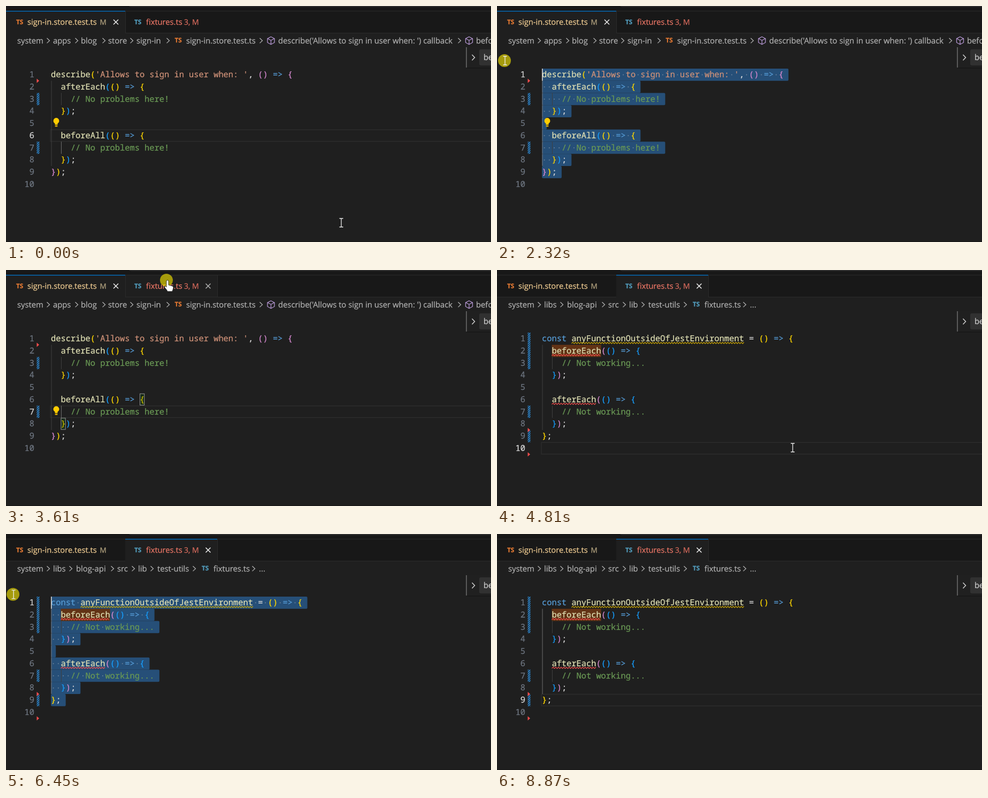
Write an HTML page that moves like this. It is 907x441 px and loops after 8950 ms.

```html
<!DOCTYPE html>
<html lang="en">
<head>
<meta charset="utf-8">
<title>Editor</title>
<style>
  html, body { margin: 0; width: 100%; height: 100%; overflow: hidden; background: #1f1f1f; }
  svg { display: block; width: 907px; height: 441px; }
  text {
    font-family: "Open Sans", "Noto Sans", sans-serif; text-rendering: geometricPrecision;
    fill: currentColor; stroke: currentColor; stroke-width: .25px;
  }
  .code text { font-family: "Noto Sans Mono", "DejaVu Sans Mono", monospace; font-size: 15.37px; }
</style>
</head>
<body>
<svg id="stage" viewBox="0 0 907 441">
  <defs>
    <pattern id="hatch" width="4" height="4" patternUnits="userSpaceOnUse">
      <path d="M-1 1L1 -1M0 4L4 0M3 5L5 3" stroke="#2b8bd8" stroke-width="1.6"/>
    </pattern>
  </defs>
  <rect width="907" height="441" fill="#1f1f1f"/>
  <rect y="440" width="907" height="1" fill="#181818"/>
  <g id="back"></g>
  <g id="text" class="code"></g>
  <g id="front" class="code"></g>
  <g id="chrome"></g>
  <g id="mouse"></g>
</svg>
<script>
const LOOP = 8950, LEFT = 84, TOP = 117, ROW = 22.75, CH = 9.222;
const layer = id => document.getElementById(id);
const colX = c => LEFT + c * CH;
const rowY = r => TOP + r * ROW;

const files = [
  {
    lines: [
      "describe('Allows to sign in user when: ', () => {",
      "  afterEach(() => {",
      "    // No problems here!",
      "  });",
      "",
      "  beforeAll(() => {",
      "    // No problems here!",
      "  });",
      "});",
      ""
    ],
    changed: [2, 6], removed: [1]
  },
  {
    lines: [
      "const anyFunctionOutsideOfJestEnvironment = () => {",
      "  beforeEach(() => {",
      "    // Not working...",
      "  });",
      "",
      "  afterEach(() => {",
      "    // Not working...",
      "  });",
      "};",
      ""
    ],
    changed: [0, 1, 2, 6, 8], removed: [8, 10],
    squiggles: [[0, 6, 35, "#cca700"], [1, 2, 10, "#f14c4c"], [5, 2, 9, "#f14c4c"]]
  }
];

// --- SVG helpers ---
const rect = (x, y, w, h, fill, more = "") =>
  `<rect x="${x}" y="${y}" width="${w}" height="${h}" fill="${fill}" ${more}/>`;
const label = (x, y, s, color, size, more = "") =>
  `<text x="${x}" y="${y}" color="${color}" font-size="${size}" ${more}>${s}</text>`;
const line = (d, color, width = 1, more = "") =>
  `<path d="${d}" fill="none" stroke="${color}" stroke-width="${width}" ${more}/>`;
const mono = (x, r, s, color, more = "") =>
  `<text x="${x}" y="${rowY(r) + 16}" color="${color}" ${more}>${s.replace(/>/g, "&gt;")}</text>`;

// --- Code text with nested bracket colours ---
const BRACKETS = ["#ffd700", "#d488ce", "#179fff"];

function highlight(lines) {
  let depth = 0, out = "";
  const color = tok => {
    if (/^[({]/.test(tok)) return BRACKETS[depth++ % 3];
    if (/^[)}]/.test(tok)) return BRACKETS[--depth % 3];
    if (tok.startsWith("//")) return "#6a9955";
    if (tok.startsWith("'")) return "#ce9178";
    if (tok === "const" || tok === "=>") return "#569cd6";
    return /\w/.test(tok) ? "#e0e0b4" : "#dcdcdc";
  };
  lines.forEach((s, r) => {
    for (const m of s.matchAll(/\/\/.*|'[^']*'|\w+|=>|\S/g))
      out += mono(colX(m.index), r, m[0], color(m[0]));
  });
  return out;
}

function squiggle([r, c, n, color]) {
  const x0 = colX(c), y = rowY(r) + 19.3;
  let d = `M${x0} ${y + 1}`;
  for (let x = 2.5, up = true; x <= n * CH; x += 2.5, up = !up) d += `L${x0 + x} ${y + (up ? -1.3 : 1.3)}`;
  return line(d, color, 1.2);
}

function fileText(f) {
  const bars = f.changed.map(r => rect(57.5, rowY(r), 5, ROW, "url(#hatch)"));
  const marks = f.removed.map(r => `<path d="M57.5 ${rowY(r) - 4}l4.5 4l-4.5 4z" fill="#f14c4c"/>`);
  return bars.join("") + marks.join("") + highlight(f.lines) + (f.squiggles || []).map(squiggle).join("");
}
const rendered = files.map(fileText);

// --- Tabs, breadcrumbs, find box ---
const chevron = x => line(`M${x - 2.5} 60l5 4.7l-5 4.7`, "#b0b0b0", 1.3);
const cube = x => line(`M${x} 57.5l6.5 3.3v7.4l-6.5 3.6l-6.5 -3.6v-7.4zM${x - 6.5} 60.8l6.5 3.5l6.5 -3.5M${x} 64.3v7.5`, "#b496d2", 1.3);
const cross = (x, color) => line(`M${x - 4.5} 25.5l9 9m0 -9l-9 9`, color, 1.5);
const badge = (x, y, color) => label(x, y, "TS", color, 11.8, 'font-weight="700"');
const crumb = (x, s, size = 14.8) => label(x, 70, s, "#b0b0b0", size);
const ORANGE = "#e37933", BLUE = "#519aba";

function crumbs(file, symbol) {
  if (!file)
    return crumb(21, "system") + crumb(88, "apps") + crumb(140, "blog") + crumb(191, "store") + crumb(244, "sign-in")
      + [79, 132, 183, 235, 303, 477, 848].map(chevron).join("")
      + badge(315.5, 68, ORANGE) + crumb(337, "sign-in.store.test.ts", 14.7)
      + cube(495.5) + crumb(509, "describe('Allows to sign in user when: ') callback")
      + cube(866) + crumb(879, "beforeAll() callback");
  return crumb(21, "system") + crumb(88, "libs") + crumb(131, "blog-api") + crumb(208, "src") + crumb(247, "lib") + crumb(283, "test-utils")
    + [79, 121, 199, 238, 273, 352, 463].map(chevron).join("")
    + badge(366, 68, BLUE) + crumb(388, "fixtures.ts")
    + (symbol ? cube(481) + crumb(494, "anyFunctionOutsideOfJestEnvironment", 14.5) : crumb(473, "..."));
}

function chrome(file, hover, symbol) {
  const [ax, aw] = file ? [223, 172] : [0, 223];
  const lit = file || hover;
  return rect(0, 0, 907, 50, "#181818")
    + line("M229 -2Q230 1 236 1H907", "#454545")
    + line("M0 9.5H907M0 50.5H907M223.5 10V50", "#2b2b2b")
    + (lit ? line("M395.5 10V50", "#2b2b2b") : "")
    + rect(ax, 10, aw, 41, "#1f1f1f")
    + (lit && !file ? rect(224, 10, 171, 40, "#1f1f1f") : "")
    + line(`M${ax} 9.6h${aw}`, "#0078d4", 1.4)
    + badge(19, 34, ORANGE) + label(40, 35.3, "sign-in.store.test.ts", "#ecc990", 14.7)
    + label(175.5, 35, "M", "#b5a581", 13.5)
    + badge(240, 34, BLUE) + label(262, 35.3, "fixtures.ts", "#e87565", 14.7)
    + label(333, 35, "3, M", "#d56a5c", 14)
    + (file ? "" : cross(205.5, "#f0f0f0"))
    + (lit ? cross(378, file ? "#f0f0f0" : "#b0b0b0") : "")
    + crumbs(file, symbol)
    + rect(861, 77, 46, 38, "#202020") + rect(860, 77, 2, 38, "#5a5a5a") + rect(862, 115, 45, 2, "#191919")
    + line("M871.5 91l5 5.3l-5 5.3", "#d0d0d0", 1.5)
    + rect(885, 81, 30, 30, "#313131", 'rx="3"')
    + label(893, 101, "beforeEach", "#cccccc", 14.8);
}

// --- Mouse: time, x, y ---
const track = [
  [0, 627, 405], [20, 627, 405], [80, 412, 413], [220, 412, 413], [310, 412, 401],
  [600, 412, 401], [620, 414, 400], [770, 414, 400], [810, 417, 400], [1600, 417, 400],
  [1830, 130, 340], [1880, 125, 338], [2300, 14, 102], [2500, 13, 102], [2740, 340, 263],
  [2900, 340, 263], [3380, 300, 19], [3660, 300, 19], [3870, 553, 336], [4240, 553, 336],
  [4260, 553, 332], [4810, 553, 332], [5100, 430, 372], [5400, 220, 378], [5690, 120, 341],
  [5740, 120, 341], [6090, 145, 290], [6480, 11, 110], [6630, 11, 110], [6840, 384, 320],
  [8160, 384, 320], [8360, 696, 428]
];
const presses = [[1850, 2500], [2740, 2860], [3560, 3640], [3880, 4000], [5720, 6580], [6850, 6960]];

function mouseAt(t) {
  const i = track.findIndex(k => k[0] > t);
  if (i < 0) return track[track.length - 1].slice(1);
  const [t0, x0, y0] = track[i - 1], [t1, x1, y1] = track[i];
  let u = (t - t0) / (t1 - t0);
  u = u * u * (3 - 2 * u);
  return [x0 + (x1 - x0) * u, y0 + (y1 - y0) * u];
}

const HAND = "M-1 2q0-2 2-2t2 2v7l7 2q2 .6 2 3l-1 4q-1 2-1 3h-9q-1-3-5-7q-1-2 .5-2.6t2.5 1.6z";
const IBEAM = "M-3.5 -8h2.5q1 0 1 1v14q0 1 -1 1h-2.5M3.5 -8h-2.5q-1 0 -1 1M3.5 8h-2.5q-1 0 -1 -1";

function mouse(t) {
  if (t >= 8360) return "";
  const [x, y] = mouseAt(t);
  const down = presses.some(([a, b]) => t >= a && t < b);
  return (down ? `<circle cx="${x}" cy="${y}" r="12" fill="#ffee00" fill-opacity=".6"/>` : "")
    + `<g transform="translate(${x + (down ? 1 : 0)} ${y})">`
    + (y < 76 ? `<path d="${HAND}" fill="#fff" stroke="#222" stroke-width=".8"/>` : line(IBEAM, "#f0f0f0", 1.3))
    + "</g>";
}

// --- Caret and selection ---
const clamp = (v, lo, hi) => Math.max(lo, Math.min(hi, v));

function hit([x, y], lines) {
  const row = clamp(Math.floor((y - TOP) / ROW), 0, lines.length - 1);
  return { row, col: clamp(Math.round((x - LEFT) / CH), 0, lines[row].length) };
}

function caretAt(t, lines) {
  const drag = end => ({ ...hit(mouseAt(Math.min(t, end)), lines), on: true, drag: true });
  const still = (row, col, since) => ({ row, col, on: Math.floor((t - since) / 500) % 2 === 0 });
  if (t < 1850) return { row: 5, col: 0, on: false };
  if (t < 2740) return drag(2500);
  if (t < 3640) return still(6, 24, 2740);
  if (t < 3880) return { row: 1, col: 12, on: false };
  if (t < 5720) return still(9, 0, 3880);
  if (t < 6860) return drag(6580);
  return t < 8360 ? still(8, 2, 6850) : { row: 8, col: 2, on: false };
}

function bulbRow(t) {
  if (t < 2740) return 4;
  if (t >= 2900 && t < 3640) return 6;
  return t >= 6600 && t < 7120 ? 1 : -1;
}

function bulb(r) {
  const y = rowY(r) + 7;
  return `<path d="M91.5 ${y + 4.5}a5.5 5.5 0 1 1 5 0v2.5h-5z" fill="#ffcc00"/>` + rect(91.5, y + 8, 5, 2.5, "#e0b000", 'rx="1"');
}

function selection(caret, lines) {
  let out = "";
  for (let r = caret.row; r < lines.length - 1; r++) {
    const from = r === caret.row ? caret.col : 0;
    out += rect(colX(from), rowY(r), (lines[r].length + 1 - from) * CH, ROW + .1, "#264f78", 'rx="2"');
  }
  return out;
}

function spaceDots(caret, lines) {
  let out = "";
  lines.forEach((s, r) => {
    if (r < caret.row) return;
    for (const m of s.matchAll(/ /g))
      if (r > caret.row || m.index >= caret.col)
        out += `<circle cx="${colX(m.index + .5)}" cy="${rowY(r) + 11.5}" r="1" fill="#6c849c"/>`;
  });
  return out;
}

function guides(row) {
  const v = (c, a, b, on) => line(`M${colX(c) + 1} ${rowY(a)}V${rowY(b)}`, on ? "#707070" : "#404040");
  return v(0, 1, 8, row === 0 || row === 8 || row === 4)
    + v(2, 2, 3, row >= 1 && row <= 3) + v(2, 6, 7, row >= 5 && row <= 7);
}

const bracketBox = (c, r) =>
  rect(colX(c) + .5, rowY(r) + .5, CH - 1, ROW - 1.5, "#00640030", 'stroke="#949494"');

function draw(t) {
  const file = t < 3640 ? 0 : 1, { lines } = files[file];
  const caret = caretAt(t, lines);
  const picked = caret.drag && caret.row < 9;

  let back = picked ? selection(caret, lines)
    : line(`M${LEFT - 1} ${rowY(caret.row) + .5}H910v${ROW - 1}H${LEFT - 1}z`, "#2c2c2c", 1.4);
  if (file) back += rect(colX(2), rowY(1), 10 * CH, ROW, "#623315");
  back += guides(caret.row);

  let front = picked ? spaceDots(caret, lines) : "";
  lines.forEach((_, r) => {
    front += mono(53, r, String(r + 1), r === caret.row ? "#d8d8d8" : "#6e7681", 'text-anchor="end"');
  });
  if (t >= 2740 && t < 3640) front += bracketBox(18, 5) + bracketBox(2, 7);
  if (bulbRow(t) >= 0) front += bulb(bulbRow(t));
  if (caret.on) front += rect(colX(caret.col), rowY(caret.row), 1.6, ROW, "#d8d8d8");

  const [mx, my] = mouseAt(t);
  const hover = mx > 223 && mx < 395 && my > 10 && my < 50;
  layer("back").innerHTML = back;
  if (draw.file !== file) layer("text").innerHTML = rendered[draw.file = file];
  layer("front").innerHTML = front;
  layer("chrome").innerHTML = chrome(file, hover, t < 4340);
  layer("mouse").innerHTML = mouse(t);
}

const start = performance.now();
function tick() {
  draw((performance.now() - start) % LOOP);
  requestAnimationFrame(tick);
}
tick();
</script>
</body>
</html>
```
